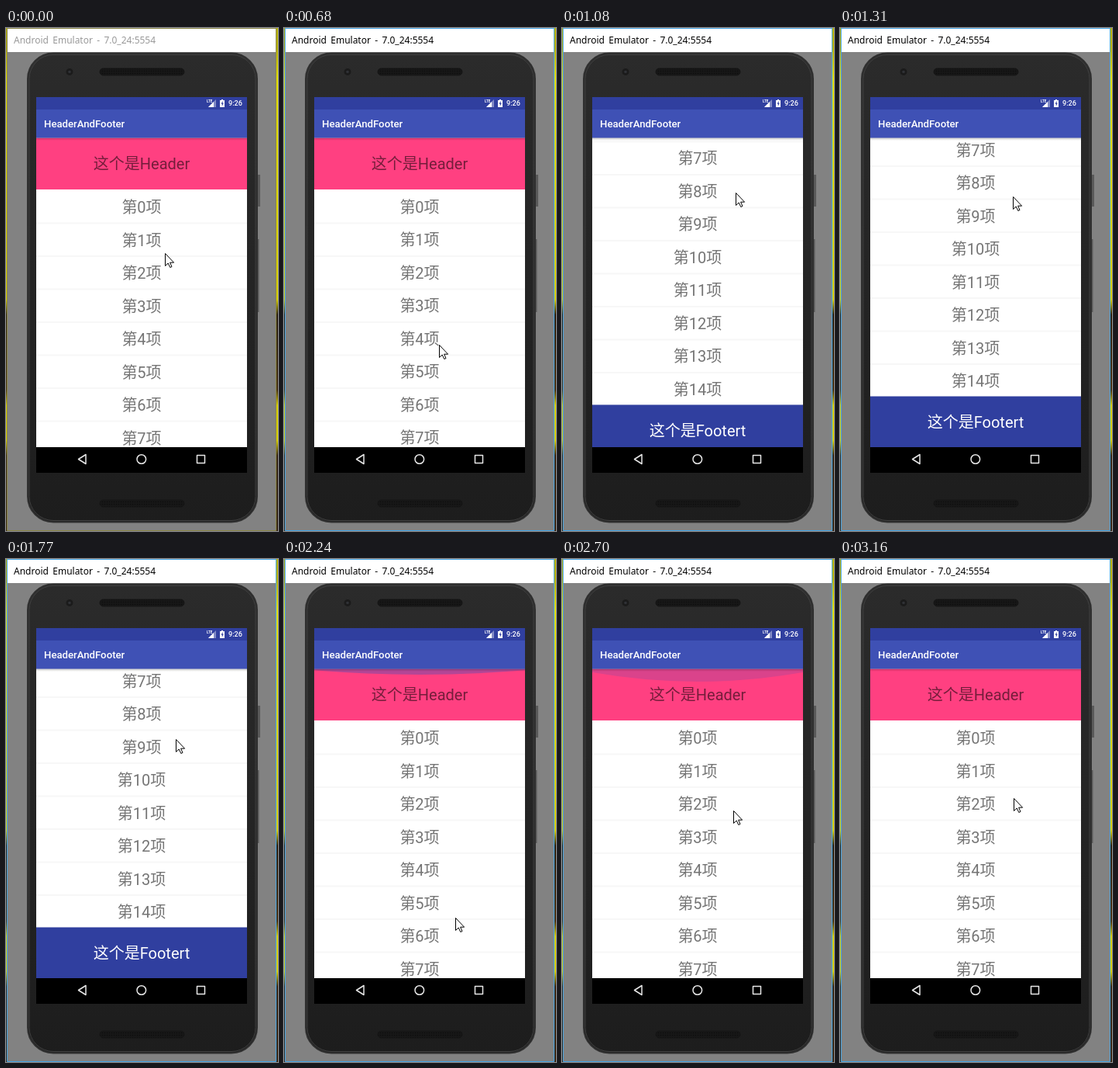
An HTML page that plays this animation: 351 px wide and 648 px high, repeating every 3.25 s.

```html
<!DOCTYPE html>
<html lang="zh-CN">
<head>
<meta charset="utf-8">
<title>HeaderAndFooter</title>
<style>
  html, body { margin: 0; width: 100%; height: 100%; overflow: hidden; background: #828282; }
  svg { display: block; }
  text { font-family: Roboto, "Noto Sans CJK SC", "Noto Sans CJK", sans-serif; }
  #list text { font-size: 20px; text-anchor: middle; }
  #title { font: 12px "Noto Sans", "Open Sans", sans-serif; word-spacing: 2.2px; }
</style>
</head>
<body>
<svg width="351" height="648" viewBox="0 0 351 648">
  <defs>
    <linearGradient id="desk" x2="0" y2="1">
      <stop offset=".04" stop-color="#b9b510"/>
      <stop offset=".1" stop-color="#e4e00a"/>
      <stop offset=".54" stop-color="#d8d00c"/>
      <stop offset=".57" stop-color="#2e2416"/>
      <stop offset=".72" stop-color="#4a3518"/>
      <stop offset=".75" stop-color="#d8d00c"/>
      <stop offset=".82" stop-color="#d8d00c"/>
      <stop offset=".85" stop-color="#3a2a1a"/>
    </linearGradient>
    <linearGradient id="shell" x2="0" y2="1">
      <stop stop-color="#2b2b2b"/>
      <stop offset="1" stop-color="#1d1d1d"/>
    </linearGradient>
    <linearGradient id="shade" x2="0" y2="1">
      <stop stop-opacity=".24"/>
      <stop offset="1" stop-opacity="0"/>
    </linearGradient>
    <pattern id="mesh" width="3" height="3" patternUnits="userSpaceOnUse">
      <rect width="3" height="3" fill="#171717"/>
      <circle cx="1.5" cy="1.5" r=".8" fill="#0c0c0c"/>
    </pattern>
    <clipPath id="view"><path d="M39 141H311V540H39z"/></clipPath>
  </defs>

  <!-- window -->
  <rect width="351" height="648" fill="url(#desk)"/>
  <path d="M2 1H348V648H2z" fill="#828282"/>
  <path d="M2 1H348V31H2z" fill="#fff"/>
  <path id="frame" d="M1.5 .5H348.5V647.5H1.5z" fill="none"/>
  <text id="title" x="10" y="20">Android Emulator - 7.0_24:5554</text>

  <!-- phone -->
  <path d="M324 189h4v41h-4zM324 272h2.5v94h-2.5z" fill="#5a5a5a"/>
  <rect x="28" y="32.5" width="296" height="604" rx="33" fill="url(#shell)" stroke="#303030" stroke-width="2"/>
  <rect x="30" y="34.5" width="292" height="600" rx="31" fill="none" stroke="#404040"/>
  <g fill="url(#mesh)" stroke="#161616">
    <rect x="121" y="52" width="109" height="9" rx="4.5"/>
    <rect x="121" y="608" width="109" height="9" rx="4.5"/>
  </g>
  <circle cx="82" cy="56.5" r="5" fill="#1b1b1b" stroke="#2c2c2c"/>
  <circle cx="82" cy="56.5" r="1.8" fill="#303236"/>

  <!-- screen -->
  <path d="M39 141H311V540H39z" fill="#fff"/>
  <g clip-path="url(#view)">
    <g id="list"></g>
    <path id="glow" fill="#3f51b5"/>
    <path d="M39 141H311V145H39z" fill="url(#shade)"/>
  </g>
  <path d="M39 89H311V105H39z" fill="#303f9f"/>
  <path d="M39 105H311V141.5H39z" fill="#3f51b5"/>
  <text x="49" y="128" font-size="13.2" font-weight="500" fill="#fff">HeaderAndFooter</text>
  <g fill="#fff">
    <text x="287" y="100.3" font-size="9.1" font-weight="500">9:26</text>
    <path d="M278 92h2v1h2v9h-6v-9h2z"/>
    <path d="M271 92v10h-10z" fill-opacity=".4"/>
    <path d="M268 95v7h-7z"/>
    <text x="259" y="96" font-size="4.5" font-weight="700">LTE</text>
  </g>
  <path d="M279.6 94l-2 3.8h1.2v3l2-4h-1.2z" fill="#303f9f"/>
  <path d="M39 540H311V573H39z"/>
  <g fill="none" stroke="#e6e6e6" stroke-width="1.5" stroke-linejoin="round">
    <path d="M103 549.5V561.5L93.5 555.5z"/>
    <circle cx="174.8" cy="555.5" r="5.8"/>
    <path d="M246.5 550.5h10v10h-10z"/>
  </g>

  <path id="cursor" d="M.5.5V16.5L4.2 13 6.8 18.5 9 17.5 6.6 12.2H11.6z" fill="#fff" stroke="#000"/>
</svg>
<script>
const $ = id => document.getElementById(id);
const LOOP = 3250, TICK = 1000 / 13, LEAD = 22;
const TOP = 141.5, PITCH = 42.5, BAND = 66.5, COUNT = 15, MAX_SCROLL = 371;
const FOCUS = 600, FLICK = 2200, GLOW = 640;

// Pointer moves: start, end, x, y
const moves = [
  [0, 140, 197, 290],
  [220, 680, 200, 408],
  [692, 1077, 224, 212],
  [1100, 1769, 219, 232],
  [FLICK, 2231, 221, 462],
  [2310, 2692, 221, 324],
  [2930, 3154, 224, 308]
];

const progress = (t, a, b) => Math.min(1, Math.max(0, (t - a) / (b - a)));
const ease = p => p * p * (3 - 2 * p);

const label = (y, fill, s) => `<text x="175" y="${y}" fill="${fill}">${s}</text>`;
const box = (y, h, fill) => `<rect x="39" y="${y}" width="272" height="${h}" fill="${fill}"/>`;
const band = (y, color, fill, s) => box(y, BAND, color) + label(y + 40.5, fill, s);

let rows = band(TOP, "#ff4081", "rgba(0,0,0,.54)", "这个是Header");
for (let i = 0; i < COUNT; i++) {
  const y = TOP + BAND + i * PITCH;
  rows += label(y + 30, "#757575", `第${i}项`) + box(y + PITCH, 2, "#f7f7f7");
}
$("list").innerHTML = rows + band(TOP + BAND + COUNT * PITCH, "#303f9f", "#fff", "这个是Footert");

function pointer(t) {
  return moves.reduce(([x, y], [a, b, toX, toY]) => {
    const p = ease(progress(t, a, b));
    return [x + (toX - x) * p, y + (toY - y) * p];
  }, [205, 290]);
}

function draw(now) {
  // The screen refreshes at a fixed, slow rate
  const t = Math.floor((now % LOOP + LEAD) / TICK) * TICK;
  const [x, y] = pointer(t).map(Math.round);
  $("cursor").setAttribute("transform", `translate(${x} ${y})`);

  const offset = t < FLICK ? MAX_SCROLL * ease(progress(t, 692, 1121)) : 0;
  $("list").setAttribute("transform", `translate(0 ${-offset})`);

  // Overscroll glow swells fast, then fades
  const p = progress(t, FLICK, FLICK + GLOW);
  const depth = 17 * (1 - Math.exp(-13 * p)), side = 141 + depth * .3;
  $("glow").setAttribute("d", `M39 141V${side}Q175 ${2 * (141 + depth) - side} 311 ${side}V141z`);
  $("glow").setAttribute("opacity", .4 * Math.sqrt(1 - p));

  const active = t >= FOCUS;
  $("title").setAttribute("fill", active ? "#000" : "#999");
  $("frame").setAttribute("stroke", active ? "#45a5e6" : "#8a8648");
  requestAnimationFrame(draw);
}
requestAnimationFrame(draw);
</script>
</body>
</html>
```
